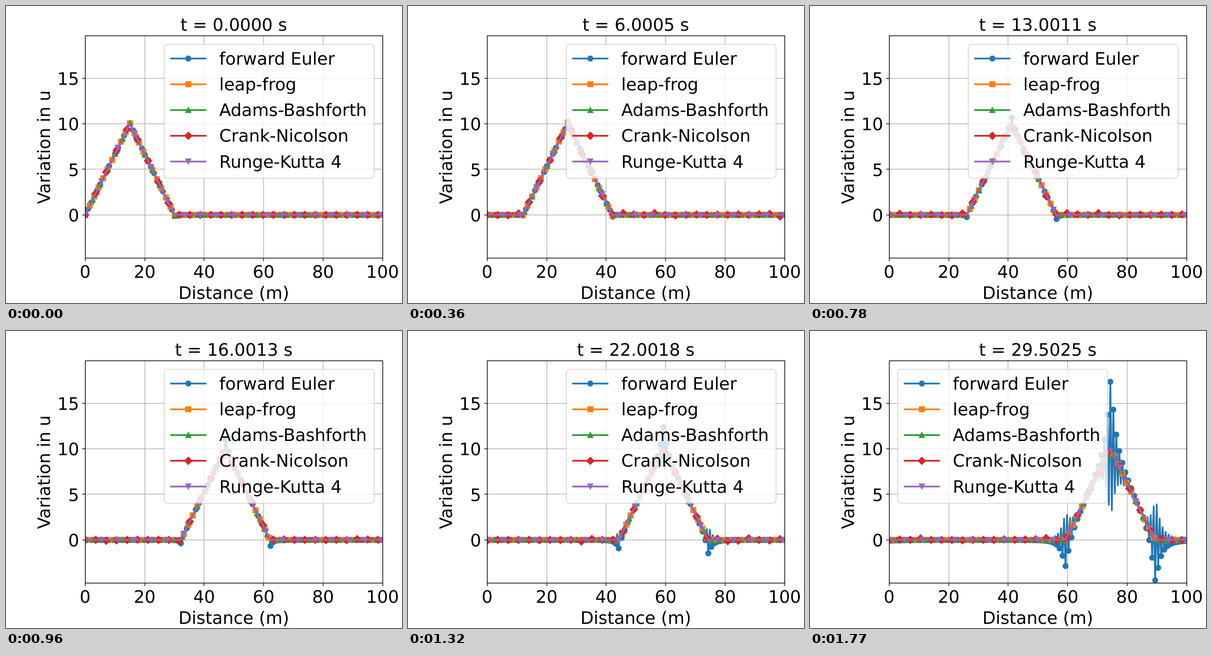
Recreate the animation shown at these times as an HTML page. Size 864x648 px, loop 1.8 s.

```html
<!DOCTYPE html>
<html lang="en">
<head>
<meta charset="utf-8">
<title>Advection schemes</title>
<style>
  html, body { margin: 0; width: 100%; height: 100%; overflow: hidden; background: #fff; }
  svg { display: block; width: 864px; height: 648px; }
  text { font: 37.5px "DejaVu Sans", sans-serif; fill: #000; text-rendering: geometricPrecision; }
  .mid { text-anchor: middle; }
  .end { text-anchor: end; }
  .grid { stroke: #b0b0b0; stroke-width: 1.5; }
  .axis { stroke: #000; stroke-width: 1.5; fill: none; }
  .line { fill: none; stroke-width: 3.75; stroke-linejoin: round; stroke-linecap: square; }
  .marks { stroke-width: 1.875; }
  .box { fill: #fff; stroke: #ccc; stroke-width: 1.875; opacity: .8; }
</style>
</head>
<body>
<svg viewBox="0 0 864 648">
  <defs><clipPath id="plot"><rect x="173" y="65" width="649" height="485"/></clipPath></defs>
  <g id="grid"></g>
  <g id="curves" clip-path="url(#plot)"></g>
  <g id="axes"><rect class="axis" x="173" y="65" width="649" height="485"/></g>
  <text id="title" class="mid" x="497" y="53.7"></text>
  <text class="mid" x="497" y="639">Distance (m)</text>
  <text class="mid" transform="translate(96.3 308) rotate(-90)">Variation in u</text>
  <g id="legend"><rect class="box" x="345.3" y="83.6" width="457.8" height="292.3" rx="7.5"/></g>
</svg>
<script>
const N = 200, FRAMES = 60, FRAME_MS = 30, STEPS = 200;
const DT = 30 / 11999, SPEED = 2, LENGTH = 100;
const DX = LENGTH / (N - 1);
const R = 5.625;

const px = x => 172.8 + 6.488 * x;
const py = u => 455.7 - 19.88 * u;
const $ = id => document.getElementById(id);

function add(parent, tag, attrs, text = "") {
  const el = document.createElementNS("http://www.w3.org/2000/svg", tag);
  for (const key in attrs) el.setAttribute(key, attrs[key]);
  el.textContent = text;
  parent.append(el);
  return el;
}

const poly = pts => (x, y) =>
  "M" + pts.map(([a, b]) => (x + a * R).toFixed(2) + " " + (y + b * R).toFixed(2)).join("L") + "Z";
const disc = (x, y) =>
  `M${(x - R).toFixed(2)} ${y.toFixed(2)}a${R} ${R} 0 1 0 ${2 * R} 0a${R} ${R} 0 1 0 ${-2 * R} 0Z`;
const D = Math.SQRT2;

const schemes = [
  { name: "forward Euler", color: "#1f77b4", every: 2, shape: disc, solve: euler },
  { name: "leap-frog", color: "#ff7f0e", every: 3, shape: poly([[-1, -1], [1, -1], [1, 1], [-1, 1]]), solve: shifted },
  { name: "Adams-Bashforth", color: "#2ca02c", every: 5, shape: poly([[0, -1], [1, 1], [-1, 1]]), solve: shifted },
  { name: "Crank-Nicolson", color: "#d62728", every: 7, shape: poly([[0, -D], [D, 0], [0, D], [-D, 0]]), solve: noisy },
  { name: "Runge-Kutta 4", color: "#9467bd", every: 11, shape: poly([[0, 1], [1, -1], [-1, -1]]), solve: shifted }
];

// Initial triangle; the last falling sample dips just below zero.
const start = Array.from({ length: N }, (_, j) => {
  const x = j * DX;
  return j <= 30 ? x * 2 / 3 : j <= 60 ? 20 - x * 2 / 3 : 0;
});

const COS = Array.from({ length: N }, (_, i) => Math.cos(2 * Math.PI * i / N));
const SIN = Array.from({ length: N }, (_, i) => Math.sin(2 * Math.PI * i / N));
const modes = Array.from({ length: N / 2 }, (_, m) => {
  let re = 0, im = 0;
  start.forEach((u, j) => {
    re += u * COS[m * j % N];
    im -= u * SIN[m * j % N];
  });
  return [re, im];
});

let seed = 11;
const random = () => (seed = seed * 16807 % 2147483647) / 2147483647;
const noise = start.map(() => 0.2 * (2 * random() - 1) ** 3);

// Each Fourier mode is multiplied by (1 - iK) once per time step.
function euler(frame) {
  const n = frame * STEPS;
  const grown = modes.map(([re, im], m) => {
    const k = 2 * Math.PI * m / LENGTH * SPEED * DT;
    const gain = (1 + k * k) ** (n / 2) * (m ? 2 : 1) / N;
    const turn = -n * Math.atan(k);
    const c = Math.cos(turn) * gain, s = Math.sin(turn) * gain;
    return [re * c - im * s, re * s + im * c];
  });
  return start.map((_, j) =>
    grown.reduce((sum, [re, im], m) => sum + re * COS[m * j % N] - im * SIN[m * j % N], 0));
}

function shifted(frame) {
  return start.map((_, j) => start[(j - 2 * frame + N) % N]);
}

function noisy(frame) {
  const ramp = Math.min(1, frame / 12);
  return shifted(frame).map((u, j) => u + ramp * noise[(j - 2 * frame + N) % N]);
}

function trace(scheme, frame) {
  const pts = scheme.solve(frame).map((u, j) => [px(j * DX), py(u)]);
  return {
    line: "M" + pts.map(([x, y]) => x.toFixed(2) + " " + y.toFixed(2)).join("L"),
    marks: pts.filter((_, j) => j % scheme.every === 0).map(p => scheme.shape(...p)).join("")
  };
}

function buildAxes() {
  for (let v = 0; v <= 100; v += 20) {
    const x = Math.round(px(v));
    if (v % 100) add($("grid"), "path", { class: "grid", d: `M${x} 65V550` });
    add($("axes"), "path", { class: "axis", d: `M${x} 550v6.56` });
    add($("axes"), "text", { class: "mid", x: px(v), y: 593.3 }, v);
  }
  for (let v = 0; v <= 15; v += 5) {
    const y = Math.round(py(v));
    add($("grid"), "path", { class: "grid", d: `M173 ${y}H822` });
    add($("axes"), "path", { class: "axis", d: `M173 ${y}h-6.56` });
    add($("axes"), "text", { class: "end", x: 159.7, y: py(v) + 14.2 }, v);
  }
}

function buildSchemes() {
  schemes.forEach((s, i) => {
    const y = 114.6 + 56.2 * i;
    const line = { class: "line", stroke: s.color };
    const marks = { class: "marks", stroke: s.color, fill: s.color };
    s.line = add($("curves"), "path", line);
    s.marks = add($("curves"), "path", marks);
    add($("legend"), "path", { ...line, d: `M360.3 ${y}h75` });
    add($("legend"), "path", { ...marks, d: s.shape(397.8, y) });
    add($("legend"), "text", { x: 465.3, y: y + 13.2 }, s.name);
  });
}

buildAxes();
buildSchemes();
const film = Array.from({ length: FRAMES }, (_, f) => schemes.map(s => trace(s, f)));

let shown = -1;
function show(frame) {
  if (frame === shown) return;
  shown = frame;
  schemes.forEach((s, i) => {
    s.line.setAttribute("d", film[frame][i].line);
    s.marks.setAttribute("d", film[frame][i].marks);
  });
  $("title").textContent = `t = ${(frame * STEPS * DT).toFixed(4)} s`;
  // The legend moves to the emptier corner late in the run.
  $("legend").setAttribute("transform", `translate(${frame < 50 ? 0 : -153.8} 0)`);
}

function tick() {
  show(Math.floor(performance.now() / FRAME_MS) % FRAMES);
  requestAnimationFrame(tick);
}
show(0);
requestAnimationFrame(tick);
</script>
</body>
</html>
```
